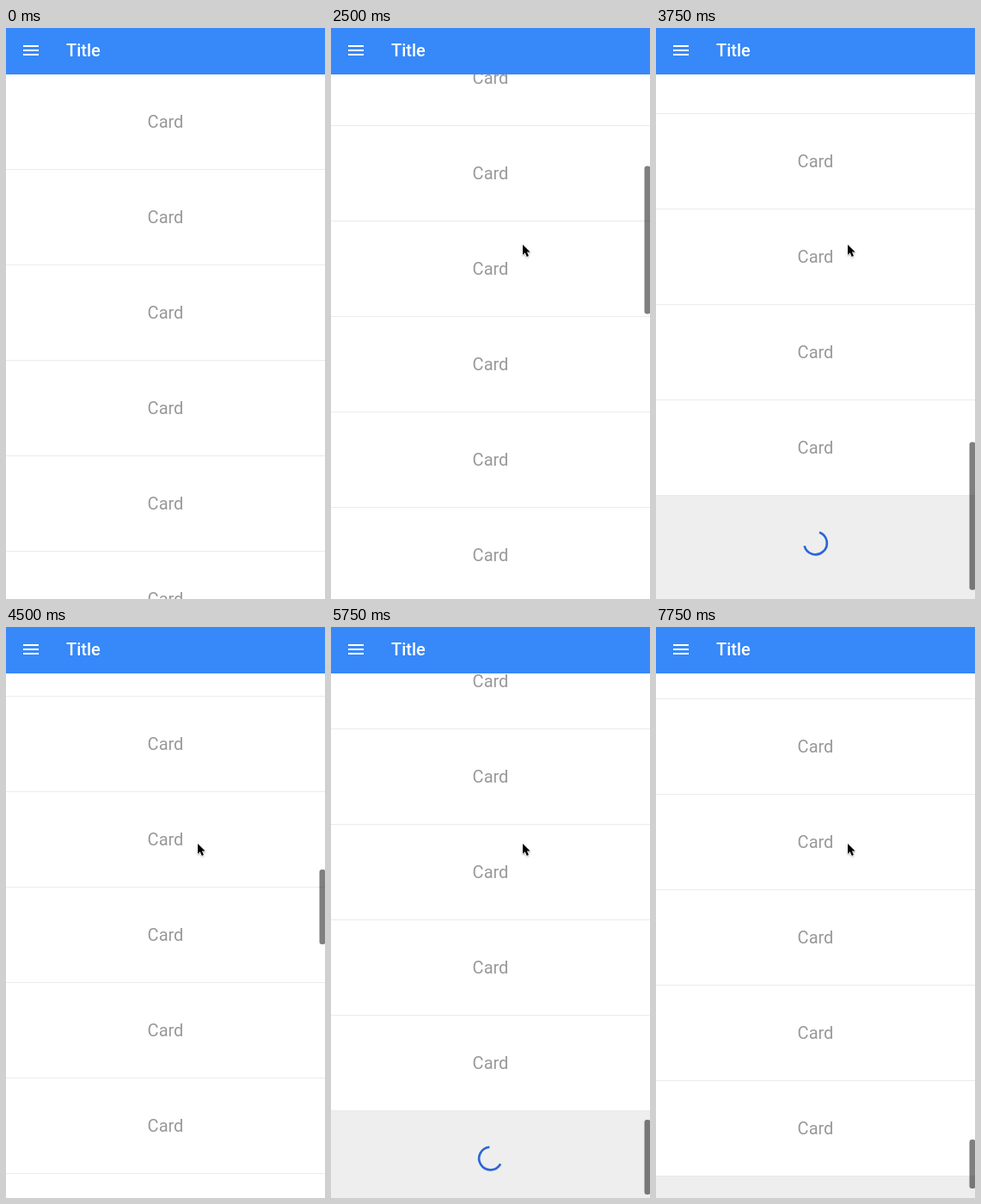
These frames come from a looping animation (371 px wide and 664 px high, 8000 ms). An HTML page:

```html
<!DOCTYPE html>
<html lang="en">
<head>
<meta charset="utf-8">
<title>Endless card list</title>
<style>
  html, body { margin: 0; width: 100%; height: 100%; overflow: hidden; background: #eee; }
  svg { display: block; width: 100%; height: 100%; }
  text { font: 400 20px Roboto, sans-serif; }
</style>
</head>
<body>
<svg viewBox="0 0 371 664">
  <defs>
    <g id="card">
      <rect width="371" height="111" fill="#fff"/>
      <rect y="110" width="371" height="1" fill="#ebebeb"/>
      <text x="185.5" y="62" text-anchor="middle" fill="#999">Card</text>
    </g>
    <filter id="soft" x="-50%" y="-50%" width="200%" height="200%">
      <feDropShadow dx="0" dy="1" stdDeviation="1" flood-opacity=".35"/>
    </filter>
  </defs>
  <rect width="371" height="664" fill="#eee"/>
  <path id="spinner" fill="none" stroke="#2a66d8" stroke-width="2.7"/>
  <g id="list"></g>
  <rect width="371" height="54" fill="#3788f8"/>
  <path d="M20 20h18v2h-18zM20 25h18v2h-18zM20 30h18v2h-18z" fill="#fff"/>
  <text x="70" y="33" fill="#fff" style="font-weight:500">Title</text>
  <rect id="thumb" x="364.5" width="7" rx="3" fill="#000" fill-opacity=".5"/>
  <path id="cursor" d="M0 0V11.8L2.7 9.3L4.8 14L6.9 13.1L4.9 8.5H8.6Z"
        fill="#000" stroke="#fff" stroke-width="1" paint-order="stroke" filter="url(#soft)"/>
</svg>
<script>
const LOOP = 8000, TICK = 250, TOP = 54, CARD = 111;

// [time, scroll offset]
const SCROLL = [
  [2000, 0], [3250, 1516], [3500, 1841], [4000, 1841], [4250, 1960], [4500, 2082],
  [5750, 4264], [6000, 4282], [6750, 5354], [7750, 6630]
];

// Each page: load time, card count, thumb height, two [scroll, thumb top] points
const PAGES = [
  { from: 0, cards: 21, size: 172, track: [[0, 3], [1516, 397]] },
  { from: 4250, cards: 43, size: 87, track: [[2082, 282], [4264, 573]] },
  { from: 6250, cards: 65, size: 57, track: [[5354, 480], [6630, 596]] }
];

const $ = id => document.getElementById(id);
const list = $('list'), spinner = $('spinner'), thumb = $('thumb'), cursor = $('cursor');

const rows = Array.from({ length: 7 }, () => {
  const row = document.createElementNS('http://www.w3.org/2000/svg', 'use');
  row.setAttribute('href', '#card');
  return list.appendChild(row);
});

const show = (el, on) => el.setAttribute('visibility', on ? 'visible' : 'hidden');
const line = ([x0, y0], [x1, y1], x) => y0 + (y1 - y0) * (x - x0) / (x1 - x0);

function scrollAt(t) {
  if (t <= SCROLL[0][0]) return 0;
  const i = SCROLL.findIndex(key => t <= key[0]);
  return i < 0 ? SCROLL.at(-1)[1] : Math.round(line(SCROLL[i - 1], SCROLL[i], t));
}

function arc(cx, cy, r, start, sweep) {
  const point = deg => {
    const a = deg * Math.PI / 180;
    return `${cx + r * Math.cos(a)} ${cy + r * Math.sin(a)}`;
  };
  return `M${point(start)}A${r} ${r} 0 ${sweep > 180 ? 1 : 0} 1 ${point(start + sweep)}`;
}

function draw(time) {
  const t = Math.floor(time / TICK) * TICK;
  const offset = scrollAt(t);
  const page = PAGES.findLast(p => t >= p.from);
  const first = Math.floor(offset / CARD);

  rows.forEach((row, i) => {
    row.setAttribute('y', TOP + (first + i) * CARD - offset);
    show(row, first + i < page.cards);
  });

  const end = TOP + page.cards * CARD - offset;
  show(spinner, end < 664);
  spinner.setAttribute('d', arc(185.5, end + 55, 13.3, 29 + (t - 5750) * 360 / 1568, 236));

  show(thumb, offset > 0);
  thumb.setAttribute('y', line(...page.track, offset));
  thumb.setAttribute('height', page.size);

  // The pointer glides in and settles
  const left = Math.max(0, (1750 - t) / 500) ** 2;
  show(cursor, t >= 1250);
  cursor.setAttribute('transform', `translate(${223 + 25 * left} ${252 - 25 * left})`);
}

function frame() {
  draw(performance.now() % LOOP);
  requestAnimationFrame(frame);
}
frame();
</script>
</body>
</html>
```
